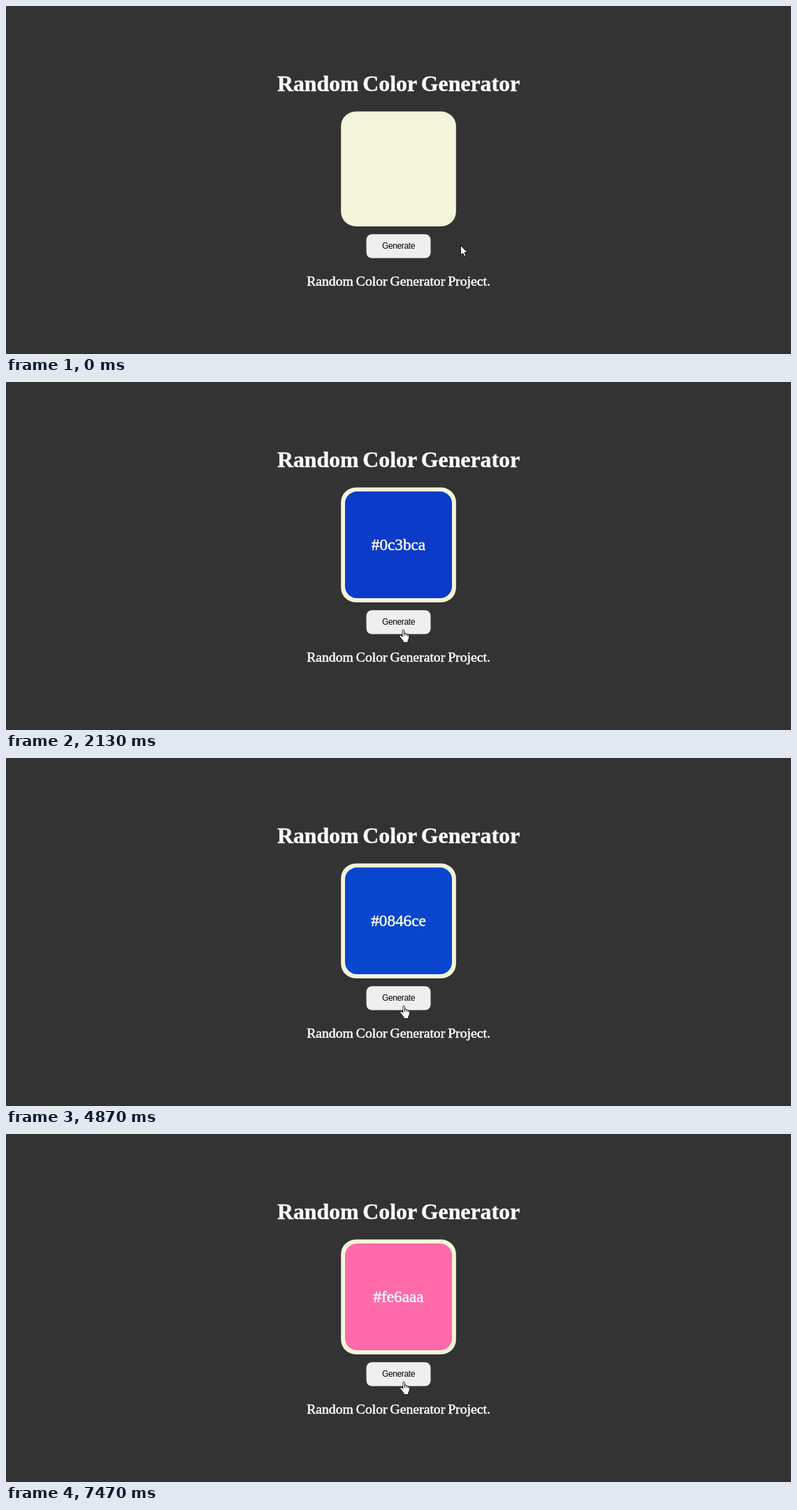
Recreate the animation shown at these times as an HTML page with a canvas. Size 1123x499 px, loop 8000 ms.

```html
<!DOCTYPE html>
<html lang="en">
<head>
<meta charset="utf-8">
<title>Random Color Generator</title>
<style>
  html, body { margin: 0; width: 100%; height: 100%; overflow: hidden; background: #333; }
  canvas { display: block; width: 1123px; height: 499px; }
</style>
</head>
<body>
<canvas id="stage" width="1123" height="499"></canvas>
<script>
const ctx = document.getElementById('stage').getContext('2d');
const LOOP = 8000;
const MID = 561.5;
const SERIF = '"Liberation Serif", "Times New Roman", serif';
const SANS = '"Liberation Sans", Arial, sans-serif';

// Each click: time in ms and the colour it produces
const clicks = [
  [1270, '#02dbc4'],
  [2130, '#0c3bca'],
  [3070, '#e7de1a'],
  [3930, '#6fb25c'],
  [4870, '#0846ce'],
  [5730, '#b8754a'],
  [6600, '#f56dd3'],
  [7470, '#fe6aaa']
];

const arrow = new Path2D('M.5 .5V16.6L4.2 13.2L6.6 18.7L9.1 17.6L6.8 12.2H11.8Z');
const hand = new Path2D(
  'M5.5 12V2Q5.5 .5 7 .5Q8.5 .5 8.5 2V6Q11.2 5.2 11.5 7Q13.8 6.4 14.2 8' +
  'Q16.5 7.6 16.5 10V14.5L14.6 18.5V21.5H6.5V19L3.5 15L.7 11.5' +
  'Q.3 9.5 2 9.4Q3.2 9.5 5.5 12Z');
const fingers = new Path2D('M8.5 6V10.5M11.5 7V10.5M14.2 8V11');

function box(x, y, w, h, r, color) {
  ctx.fillStyle = color;
  ctx.beginPath();
  ctx.roundRect(x, y, w, h, r);
  ctx.fill();
}

function label(text, y, font, color, { weight = 0, letter = 0, word = 0 } = {}) {
  ctx.font = font;
  ctx.letterSpacing = letter + 'px';
  ctx.wordSpacing = word + 'px';
  ctx.fillStyle = ctx.strokeStyle = color;
  ctx.fillText(text, MID, y);
  if (weight) {
    ctx.lineWidth = weight;
    ctx.strokeText(text, MID, y);
  }
}

function pointer(t) {
  const step = t < 70 ? 0 : Math.min(10, 1 + Math.floor((t - 70) * 9 / 600));
  const p = (1 - Math.cos(Math.PI * step / 10)) / 2;
  const q = 1 - p;
  const bend = (a, b, c) => a * q * q + 2 * b * p * q + c * p * p;
  return {
    x: bend(650, 604, 568) + (t >= 2670 ? 0.8 : 0),
    y: bend(343, 402, 355)
  };
}

function drawPointer({ x, y }) {
  const over = x > 515 && x < 608 && y > 327 && y < 362;
  ctx.save();
  ctx.translate(over ? x - 5.6 : x, y);
  ctx.scale(0.86, 0.86);
  ctx.fillStyle = '#fff';
  ctx.strokeStyle = '#000';
  ctx.lineWidth = 1;
  const shape = over ? hand : arrow;
  ctx.fill(shape);
  ctx.stroke(shape);
  if (over) ctx.stroke(fingers);
  ctx.restore();
}

function draw(t) {
  ctx.fillStyle = '#333';
  ctx.fillRect(0, 0, 1123, 499);
  ctx.textAlign = 'center';
  ctx.lineJoin = 'round';

  label('Random Color Generator', 122, `bold 31.8px ${SERIF}`, '#fff', { weight: 0.4, word: -2.2 });

  box(479.2, 151.3, 164.6, 164.6, 21, '#f5f5dc');
  const last = clicks.filter(([time]) => time <= t).pop();
  if (last) {
    box(485, 157.1, 153, 153, 17, last[1]);
    label(last[1], 241, `23.2px ${SERIF}`, '#fff', { weight: 0.5 });
  }

  box(515.5, 327.2, 92, 34.4, 8, '#efefef');
  label('Generate', 348, `12px ${SANS}`, '#000', { letter: -0.38 });
  label('Random Color Generator Project.', 401, `19.7px ${SERIF}`, '#fff', { weight: 0.5, word: -1 });

  drawPointer(pointer(t));
}

const start = performance.now();
function tick() {
  draw((performance.now() - start) % LOOP);
  requestAnimationFrame(tick);
}
tick();
</script>
</body>
</html>
```
